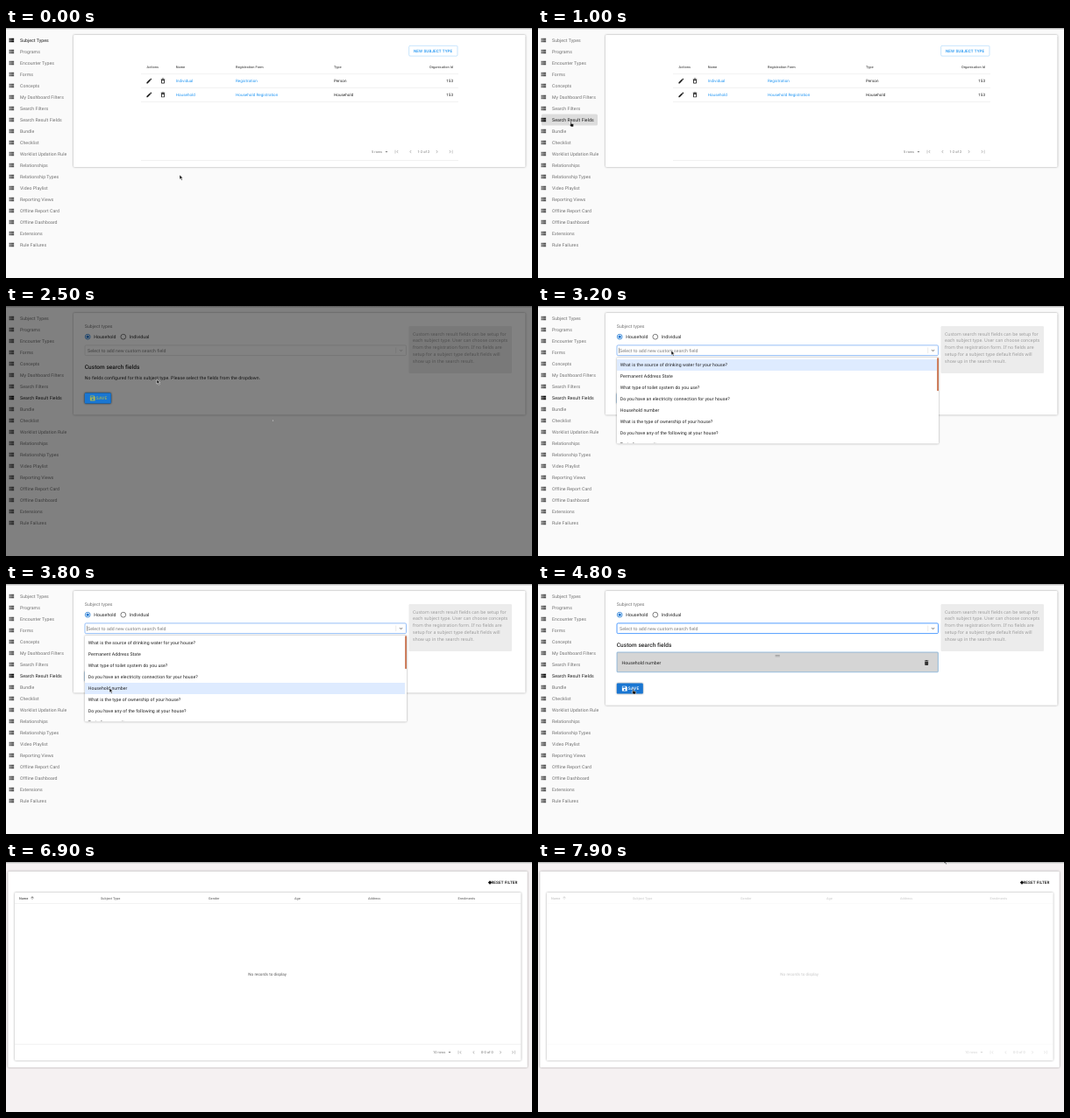
Write an HTML page that moves like this. It is 600 px wide and 286 px high and loops after 8000 ms.

```html
<!DOCTYPE html>
<html lang="en">
<head>
<meta charset="utf-8">
<title>Search field setup</title>
<style>
  html, body { margin: 0; width: 100%; height: 100%; overflow: hidden; background: #fafafa; }
  svg { display: block; width: 100vw; height: 100vh; }
  text { font-family: Roboto, Arial, sans-serif; text-rendering: geometricPrecision; white-space: pre; }
  .card { fill: #fff; filter: drop-shadow(0 .6px .9px rgba(0, 0, 0, .38)); }
  .raised { filter: drop-shadow(0 .7px .8px rgba(0, 0, 0, .4)); }
</style>
</head>
<body>
<svg id="stage" viewBox="0 0 600 286" preserveAspectRatio="none"></svg>
<script>
const LOOP = 8000;
const BLUE = '#2196f3';

const ICON = {
  list: 'M4 14h4v-4H4zM4 19h4v-4H4zM4 9h4V5H4zM9 14h12v-4H9zM9 19h12v-4H9zM9 5v4h12V5z',
  edit: 'M3 17.2V21h3.8L17.8 9.9l-3.7-3.7zM20.7 7a1 1 0 000-1.4l-2.3-2.3a1 1 0 00-1.4 0l-1.9 1.8 3.8 3.8z',
  bin: 'M6 19a2 2 0 002 2h8a2 2 0 002-2V7H6zM19 4h-3.5l-1-1h-5l-1 1H5v2h14z',
  save: 'M17 3H5a2 2 0 00-2 2v14a2 2 0 002 2h14a2 2 0 002-2V7zM12 19a3 3 0 110-6 3 3 0 010 6zM15 9H5V5h10z',
  tick: 'M12 2a10 10 0 100 20 10 10 0 000-20zM10 17l-5-5 1.4-1.4 3.6 3.6 7.6-7.6L19 8z',
  close: 'M5 6.4L6.4 5 12 10.6 17.6 5 19 6.4 13.4 12 19 17.6 17.6 19 12 13.4 6.4 19 5 17.6 10.6 12z',
  up: 'M4 12l1.4 1.4L11 7.8V20h2V7.8l5.6 5.6L20 12l-8-8z',
  caret: 'M7 10l5 5 5-5z',
  left: 'M15.4 7.4L14 6l-6 6 6 6 1.4-1.4L10.8 12z',
  right: 'M8.6 16.6L13.2 12 8.6 7.4 10 6l6 6-6 6z',
  down: 'M7.4 8.6L12 13.2l4.6-4.6L18 10l-6 6-6-6z'
};

// y is the vertical middle of the capitals
function text(x, y, str, { size = 5.2, fill = '#222', weight = 400, gap = .0094, more = '' } = {}) {
  return `<text x="${x}" y="${y + size * .355}" font-size="${size}" font-weight="${weight}"
    fill="${fill}" letter-spacing="${size * gap}" ${more}>${str}</text>`;
}
function icon(name, x, y, fill = '#222', size = 7.8) {
  const k = size / 24;
  return `<path d="${ICON[name]}" fill="${fill}" fill-rule="evenodd"
    transform="translate(${x - size / 2} ${y - size / 2}) scale(${k})"/>`;
}
function rect(x, y, w, h, fill, more = '') {
  return `<rect x="${x}" y="${y}" width="${w}" height="${h}" fill="${fill}" ${more}/>`;
}
function card(x, y, w, h) {
  return rect(x, y, w, h, '#fff', 'class="card" rx="1.2"');
}
function group(id, body, more = '') {
  return `<g id="${id}" ${more}>${body}</g>`;
}

const small = { size: 4.55 };
const caps = { size: 4.55, weight: 500, gap: .0286 };
const BAR = { x: -3.1, w: .6, h: 4 };

function pager(y, rows, range, [label, caret, first, prev, mid, next, last], fill, pale) {
  const stop = x => rect(x, y - BAR.h / 2, BAR.w, BAR.h, pale);
  return text(label, y, rows, { size: 4, fill }) + icon('caret', caret, y, fill, 7)
    + stop(first - 2.3) + icon('left', first + .5, y, pale, 7) + icon('left', prev, y, pale, 7)
    + text(mid, y, range, { size: 4, fill }) + icon('right', next, y, pale, 7)
    + icon('right', last - .5, y, pale, 7) + stop(last + 1.8);
}

// ---------- side menu ----------
const NAV = ['Subject Types', 'Programs', 'Encounter Types', 'Forms', 'Concepts',
  'My Dashboard Filters', 'Search Filters', 'Search Result Fields', 'Bundle', 'Checklist',
  'Worklist Updation Rule', 'Relationships', 'Relationship Types', 'Video Playlist',
  'Reporting Views', 'Offline Report Card', 'Offline Dashboard', 'Extensions', 'Rule Failures'];
const navY = i => 14 + i * 13;

function nav(active) {
  return NAV.map((name, i) => icon('list', 6.2, navY(i), i === active ? '#111' : '#555')
    + text(16, navY(i), name, { fill: i === active ? '#1c1c1c' : '#717171' })).join('');
}

// ---------- subject type table ----------
function tablePage() {
  const head = { size: 3.9, fill: '#555', weight: 500 };
  const link = { size: 4.55, fill: BLUE };
  const end = 'text-anchor="end"';
  const row = (y, name, form, type) =>
    icon('edit', 163.3, y) + icon('bin', 179, y, '#222') + rect(177.9, y - .5, 2.2, 2.7, '#fff')
    + text(193.7, y, name, link) + text(262, y, form, link)
    + text(374, y, type, small) + text(510, y, '153', { ...small, more: end })
    + rect(154, y + 7.6, 362, .4, '#dedede');
  return card(77, 8, 515.5, 151)
    + rect(459.7, 20.3, 55.3, 11.8, 'none', 'rx="1.3" stroke="#90caf9" stroke-width=".5"')
    + text(465, 26.2, 'NEW SUBJECT TYPE', { ...caps, fill: BLUE })
    + text(160.5, 44.3, 'Actions', head) + text(193.7, 44.3, 'Name', head)
    + text(262, 44.3, 'Registration Form', head) + text(374, 44.3, 'Type', head)
    + text(510, 44.3, 'Organisation Id', { ...head, more: end })
    + rect(154, 52.3, 362, .4, '#dedede')
    + row(60.5, 'Individual', 'Registration', 'Person')
    + row(76.4, 'Household', 'Household Registration', 'Household')
    + rect(154, 151.3, 362, .4, '#dcdcdc')
    + pager(141.6, '5 rows', '1-2 of 2', [417, 434, 446, 461.5, 469.5, 491.5, 507], '#777', '#aaa');
}

// ---------- search field form ----------
const HELP = ['Custom search result fields can be setup for', 'each subject type. User can choose concepts',
  'from the registration form. If no fields are', 'setup for a subject type default fields will',
  'show up in the search result.'];
const OPTIONS = ['What is the source of drinking water for your house?', 'Permanent Address State',
  'What type of toilet system do you use?', 'Do you have an electricity connection for your house?',
  'Household number', 'What is the type of ownership of your house?',
  'Do you have any of the following at your house?', 'Part of community'];

function radio(x, label, on) {
  return `<circle cx="${x}" cy="35.2" r="2.9" fill="none" stroke="${on ? '#1976d2' : '#555'}" stroke-width=".75"/>`
    + (on ? `<circle cx="${x}" cy="35.2" r="1.6" fill="#1976d2"/>` : '') + text(x + 7, 35.2, label);
}
function saveButton(id, y, fill, ink) {
  return group(id, rect(89.8, y, 30, 12, fill, 'rx="1.2" class="raised"')
    + icon('save', 98.8, y + 6, ink) + text(102.8, y + 6, 'SAVE', { ...caps, size: 4.9, fill: ink }));
}
function formPage() {
  const help = HELP.map((line, i) => text(464, 31.7 + i * 7.85, line,
    { fill: '#9a9a9a', gap: 0, more: 'style="font-family:\'Noto Sans\',sans-serif"' })).join('');
  return text(89.8, 23, 'Subject types', { fill: '#757575' })
    + radio(93.2, 'Household', true) + radio(133.8, 'Individual', false)
    + rect(90, 44.9, 366.5, 11.7, '#fff', 'id="select" rx="1.3" stroke="#ccc" stroke-width=".5"')
    + rect(444.7, 47.4, .4, 6.8, '#ccc')
    + group('arrow', icon('down', 450.6, 50.8, 'currentColor', 7))
    + text(93, 50.8, 'Select to add new custom search field', { fill: '#7c7c7c' })
    + rect(92.5, 47.8, .4, 6, '#222', 'id="beam"')
    + text(89.8, 70, 'Custom search fields', { size: 6.5, weight: 500, gap: .0075 })
    + rect(459.5, 23, 117.5, 54, '#ececec', 'rx="1.2"') + help
    + group('none', text(89.8, 82.2,
        'No fields configured for this subject type. Please select the fields from the dropdown.')
      + saveButton('saveTop', 99.5, BLUE, '#fff'))
    + group('chosen', rect(90, 78, 366.4, 22.8, '#d5d5d5', 'rx=".8" stroke="#5b9ad2" stroke-width=".6"')
      + rect(270.6, 81.4, 5.2, .6, '#888') + rect(270.6, 82.6, 5.2, .6, '#888')
      + text(95.6, 90, 'Household number') + icon('bin', 443.2, 90, '#333')
      + saveButton('save', 113.6, 'currentColor', '#fff'));
}
function menu() {
  return rect(90, 58.9, 367, 98.6, '#fff', 'class="card" rx="1.3"')
    + rect(90, 61, 365, 13, '#deebff', 'id="pick"')
    + `<clipPath id="cut">${rect(90, 59, 367, 98, '#000')}</clipPath><g clip-path="url(#cut)">`
    + OPTIONS.map((o, i) => text(93.7, 67.4 + i * 13, o)).join('') + '</g>'
    + rect(455.2, 59.3, 1.8, 38, '#c8704c', 'rx=".8"');
}
function toast() {
  return rect(251.7, 260, 94, 18, '#43a047', 'rx="1.3" class="raised"')
    + icon('tick', 260.3, 269, '#e4f3e5', 6.8) + text(266.3, 269, 'Saved successfully', { ...small, fill: '#d5edd6' })
    + icon('close', 335.8, 269, '#d5edd6', 6);
}

// ---------- record search ----------
function searchPage() {
  const head = { size: 3.8, fill: '#777', weight: 500 };
  const cols = [[108, 'Subject Type'], [231, 'Gender'], [329, 'Age'], [413, 'Address'], [515.5, 'Enrolments']];
  return rect(0, 2, 600, 284, '#f5f1f2') + card(2.3, 10.7, 592.5, 224.3)
    + '<path d="M552 21.3l2.2 2.2-2.2 2.2-2.2-2.2z" fill="#111"/>'
    + text(553.4, 23.5, 'RESET FILTER', { ...caps, fill: '#111' })
    + card(10, 35, 577.5, 192)
    + text(15, 41.2, 'Name', { ...head, fill: '#555' }) + icon('up', 30, 41.2, '#555', 5.5)
    + cols.map(([x, name]) => text(x, 41.2, name, head)).join('')
    + rect(10, 47.5, 577.5, .4, '#ddd')
    + text(276.3, 128.6, 'No records to display', { ...small, fill: '#555' })
    + rect(10, 208.5, 577.5, .4, '#ddd')
    + pager(217.7, '10 rows', '0-0 of 0', [487, 506, 518, 533.5, 542, 564, 578.5], '#777', '#aaa')
    + rect(10, 35, 577.5, 192, '#fff', 'id="veil"');
}

const stage = document.getElementById('stage');
stage.innerHTML = `<defs><linearGradient id="shade" x2="0" y2="1">
    <stop stop-color="#000" stop-opacity=".34"/><stop offset="1" stop-color="#000" stop-opacity="0"/>
  </linearGradient></defs>`
  + rect(0, 0, 600, 286, '#fafafa')
  + group('admin', rect(4, 98.5, 64, 13, '#000', 'id="hover" rx="1.5" opacity=".12"')
    + group('navOne', nav(0)) + group('navTwo', nav(7))
    + group('table', tablePage())
    + card(77, 8, 515.5, 25.5).replace('<rect', '<rect id="panel"')
    + group('form', formPage()) + group('menu', menu()) + group('toast', toast()))
  + group('search', searchPage())
  + rect(0, 0, 600, 2.2, 'url(#shade)')
  + group('busy', rect(0, 0, 600, 286, '#000', 'opacity=".49"')
    + '<circle id="dot" r=".6" fill="#ddd"/>' + saveButton('saveBusy', 99.5, '#1976d2', '#a3b35a'))
  + group('cursor', '<path id="tip" stroke="#fff" stroke-width=".5" fill="#111"/>');

const $ = {};
stage.querySelectorAll('[id]').forEach(n => $[n.id] = n);
const show = (id, on) => $[id].setAttribute('display', on ? 'inline' : 'none');
const set = (id, name, value) => $[id].setAttribute(name, value);
const ramp = (t, a, b) => Math.min(1, Math.max(0, (t - a) / (b - a)));

const ARROW = 'M0 0v5.2l1.2-1.1 1 2.1 1-.5-1-2h1.7z';
const HAND = 'M0 0q.6-.7 1.1 0v2.3l2 .5q.8.2.7 1L3.3 6H.7L-1.2 3.7q.2-.8 1.2 0z';

// pointer stops: time, x, y
const PATH = [[0, 198, 168], [150, 198, 168], [900, 37, 107], [1400, 37, 107], [2400, 172, 84],
  [2600, 172, 84], [3050, 152, 51], [3300, 152, 51], [3750, 118, 119], [3950, 118, 119],
  [4600, 108, 120], [5100, 108, 120], [5800, 484, 21], [6250, 550, 2], [6550, 548, -10],
  [7500, 500, -10], [7900, 463, -3.5], [8000, 463, -3.5]];

function pointer(t) {
  const i = PATH.findIndex((p, n) => n && t <= p[0]);
  const [a, x, y] = PATH[i - 1], [b, u, v] = PATH[i];
  const k = ramp(t, a, b), e = k * k * (3 - 2 * k);
  return [x + (u - x) * e, y + (v - y) * e];
}

function draw(t) {
  const [x, y] = pointer(t);
  const admin = t < 6700, form = t >= 2000, picked = t >= 3900;
  const open = t >= 3050 && !picked;
  const focus = t >= 3050 && t < 4950;
  const busy = t >= 1200 && t < 2650;

  show('admin', admin);
  show('search', !admin);
  show('navOne', t < 1000);
  show('navTwo', t >= 1000);
  show('table', t < 1100);
  show('panel', t >= 1100);
  set('panel', 'height', picked ? 130.7 : form ? 116.5 : 25.5);
  show('form', form);
  show('none', !picked);
  show('chosen', picked);

  const row = Math.round((y - 14) / 13);
  const onNav = admin && x < 70 && row >= 0 && row < NAV.length;
  show('hover', onNav);
  set('hover', 'y', navY(row) - 6.5);

  set('select', 'stroke', open ? '#7aaef5' : focus ? '#2684ff' : '#ccc');
  set('select', 'stroke-width', focus ? .8 : .5);
  set('arrow', 'color', focus ? '#555' : '#bbb');
  show('beam', open);
  show('menu', open);
  set('pick', 'y', 61 + 13 * Math.max(0, Math.floor((y - 61) / 13)));

  const onSave = picked && x > 90 && x < 120 && y > 113 && y < 126;
  set('save', 'color', onSave ? '#1976d2' : BLUE);
  show('toast', t >= 5150);
  set('toast', 'opacity', ramp(t, 5150, 5350));

  show('busy', busy);
  show('saveBusy', form);
  set('dot', 'cx', form ? 304.5 : 303);
  set('dot', 'cy', form ? 131 : 136.6);
  set('veil', 'opacity', .68 * ramp(t, 7550, 7750));

  const onSelect = form && admin && y > 45 && y < 57 && x > 90 && x < 456;
  set('tip', 'd', onNav || onSave || onSelect && !open ? HAND : ARROW);
  set('cursor', 'transform', `translate(${x} ${y})`);
}

const start = performance.now();
function tick() {
  draw((performance.now() - start) % LOOP);
  requestAnimationFrame(tick);
}
tick();
</script>
</body>
</html>
```
